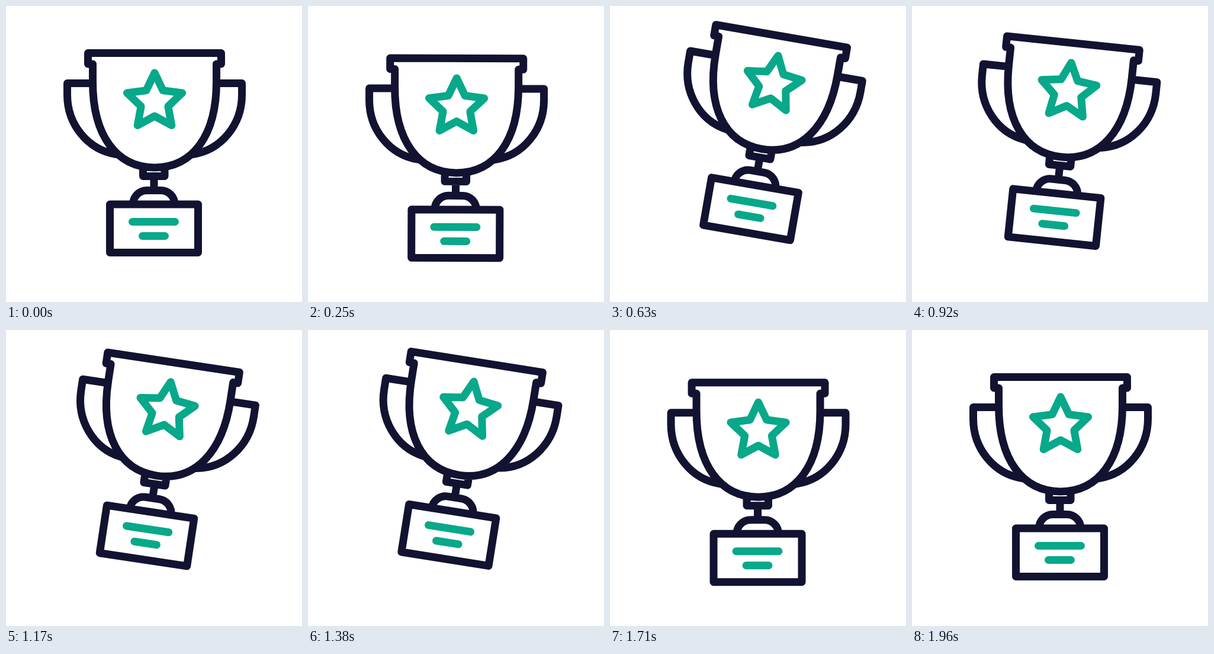
Animation, 500 px wide and 500 px high, one loop 2000 ms. Source, as an HTML page with a canvas:

```html
<!DOCTYPE html>
<html lang="en">
<head>
<meta charset="utf-8">
<title>Trophy</title>
<style>
html, body { margin: 0; width: 100%; height: 100%; overflow: hidden; background: #fff; }
canvas { display: block; width: 500px; height: 500px; }
</style>
</head>
<body>
<canvas id="stage" width="500" height="500"></canvas>
<script>
const ctx = document.getElementById('stage').getContext('2d');
const NAVY = '#121331', GREEN = '#08a88a';
const LOOP = 2000, FPS = 24;
const PIVOT = { x: 250, y: 306 };

// time in ms, x and y offset, rotation in degrees
const keys = [
  [0, 0, 0, 0],
  [220, -0.5, 9.7, 0],
  [585, 0, -32.5, 10],
  [955, -2.2, -17.8, 5.85],
  [1305, -1.3, -32.5, 10],
  [1670, -0.5, 9.7, 0],
  [1958, 0, 0, 0]
];

const body = new Path2D(
  // rim and bowl
  'M146.5 98H138.5V79.5H363.5V98H355.5' +
  'M146.5 98V128C146.5 218.5 186.5 273 251 273S355.5 218.5 355.5 128V98' +
  // handles
  'M146 130.5H103.5V150C103.5 200 138 243 186 250.5' +
  'M356 130.5H398.5V150C398.5 200 364 243 316 250.5' +
  // collar, stem and dome
  'M231.5 275V287.5H268V275' +
  'M250 288V311' +
  'M214.5 335A23.5 23.5 0 0 1 238 311.5H261.5A23.5 23.5 0 0 1 285 335' +
  // plaque
  'M175.5 335H324.5V416.5H175.5Z'
);

const trim = new Path2D('M213.5 364.5H285.5M230.5 388.5H268.5');
trim.addPath(star(251, 162, 49, 24));

function star(cx, cy, outer, inner) {
  const path = new Path2D();
  for (let i = 0; i < 10; i++) {
    const a = i * Math.PI / 5, r = i % 2 ? inner : outer;
    path.lineTo(cx + r * Math.sin(a), cy - r * Math.cos(a));
  }
  path.closePath();
  return path;
}

const ease = u => u * u * (3 - 2 * u);

function pose(t) {
  const i = keys.findIndex(k => k[0] > t);
  if (i < 0) return keys[keys.length - 1].slice(1);
  const a = keys[i - 1], b = keys[i];
  const u = ease((t - a[0]) / (b[0] - a[0]));
  return a.slice(1).map((v, n) => v + (b[n + 1] - v) * u);
}

function stroke(path, color) {
  ctx.strokeStyle = color;
  ctx.stroke(path);
}

function draw(t) {
  const frame = Math.floor((t + 4) * FPS / 1000) % (LOOP * FPS / 1000);
  const [x, y, deg] = pose(frame * 1000 / FPS);
  ctx.setTransform(1, 0, 0, 1, 0, 0);
  ctx.fillStyle = '#fff';
  ctx.fillRect(0, 0, 500, 500);
  ctx.translate(PIVOT.x + x, PIVOT.y + y);
  ctx.rotate(deg * Math.PI / 180);
  ctx.translate(-PIVOT.x, -PIVOT.y);
  ctx.lineWidth = 13;
  ctx.lineCap = ctx.lineJoin = 'round';
  stroke(body, NAVY);
  stroke(trim, GREEN);
}

const start = performance.now();
function tick() {
  draw((performance.now() - start) % LOOP);
  requestAnimationFrame(tick);
}
tick();
</script>
</body>
</html>
```
